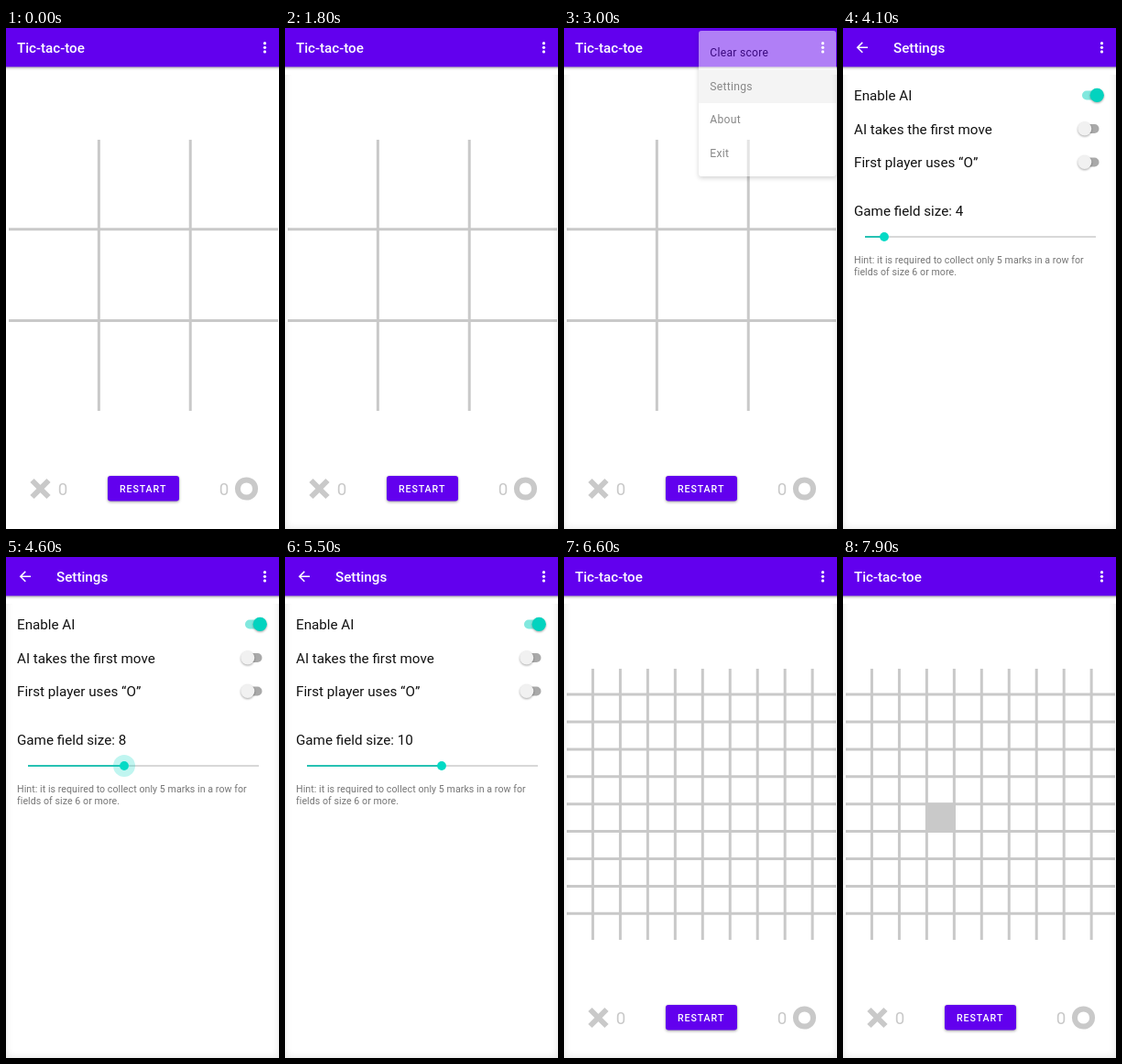
An HTML page that plays this animation: 298x547 px, repeating every 8000 ms.

```html
<!DOCTYPE html>
<html lang="en">
<head>
<meta charset="utf-8">
<title>Tic-tac-toe</title>
<style>
@property --size { syntax: '<integer>'; inherits: true; initial-value: 3; }

html, body { margin: 0; width: 100%; height: 100%; overflow: hidden; background: #fff; }
body { position: relative; font-family: Roboto, sans-serif; }
svg, .settings { position: absolute; left: 0; top: 0; width: 298px; height: 547px; }
svg { display: block; }

/* Every part shares one clock; the tiny head start keeps steps clear of their boundaries */
.edge, .small, .large, .cell, .menu, .ripple::before, .settings, .halo {
  animation: 8s step-end -5ms infinite;
}

.bar { fill: #6200ee; filter: drop-shadow(0 1px 1.5px rgba(0,0,0,.4)); }
.title { font-size: 15.2px; font-weight: 500; fill: #fff; }
.dots { fill: #fff; }
.grid { stroke: #c9c9c9; stroke-width: 3; fill: none; }
.mark { stroke: #c9c9c9; stroke-width: 6; fill: none; }
.score { font-size: 18.8px; fill: #c9c9c9; text-anchor: middle; }
.button { fill: #6200ee; filter: drop-shadow(0 1px 1.5px rgba(0,0,0,.4)); }
.label { font-size: 10.6px; font-weight: 500; letter-spacing: .95px; fill: #fff; }
.cell { fill: #c9c9c9; animation-name: cell; }
.small { animation-name: small; }
.large { animation-name: large; }

.menu {
  position: absolute; left: 147px; top: 3px; width: 150px; height: 146px; padding: 6.4px 0;
  background: #fff; border-radius: 3px; box-shadow: 0 2px 5px rgba(0,0,0,.35);
  color: #111; font-size: 12.14px; letter-spacing: .28px; line-height: 36.5px;
  animation-name: menu;
}
.menu div { position: relative; height: 36.5px; padding-left: 12.3px; overflow: hidden; }
.menu span { position: relative; }
.ripple::before {
  content: ''; position: absolute; left: 50%; top: 50%; width: 100px; height: 100px;
  margin: -50px; border-radius: 50%; background: #e8e8e8; animation-name: ripple;
}

.settings { background: #fff; animation-name: open, size; }
.row { font-size: 15.2px; fill: #111; }
.hint { font-size: 10.62px; letter-spacing: .06px; fill: #757575; }
.size {
  position: absolute; left: 12px; top: 190px; margin: 0;
  font-size: 15.2px; line-height: 20px; color: #111; white-space: pre;
}
.size::after { counter-reset: n var(--size); content: counter(n); }
.knob { transform: translateX(calc((var(--size) - 3) * 21px)); fill: #03dac5; }
.progress { transform: scaleX(calc((var(--size) - 3) / 12)); fill: #14bfb0; }
.halo { animation-name: halo; }
.thumb { filter: drop-shadow(0 1px 1px rgba(0,0,0,.35)); }

.edge {
  position: absolute; left: 0; top: 43px; width: 298px; height: 504px;
  box-shadow: inset 0 0 9px rgba(0,0,0,.11); clip-path: inset(8px 0 0 0);
  animation-name: edge;
}

@keyframes edge { 0% { opacity: 0 } 1.25%, 100% { opacity: 1 } }
@keyframes menu {
  0% { opacity: 0; clip-path: inset(0 0 90% 70%) }
  23.75% { opacity: .35; clip-path: inset(-3px -1px 70% 45%) }
  25% { opacity: .75; clip-path: inset(-3px -1px 35% 18%) }
  26.25% { opacity: 1; clip-path: inset(-3px -1px 8% 3%) }
  27.5% { opacity: 1; clip-path: inset(-3px -1px -9px -8px) }
  37.5% { opacity: .5; clip-path: inset(-3px -1px -9px -8px) }
  38.75%, 100% { opacity: 0 }
}
@keyframes ripple {
  0% { transform: scale(0) }
  35% { transform: scale(1) }
  36.25%, 100% { transform: scale(1.7) }
}
@keyframes open {
  0% { opacity: 0; transform: translateY(30px) }
  38.75% { opacity: .45; transform: translateY(16px) }
  40% { opacity: .9; transform: translateY(4px) }
  41.25% { opacity: 1; transform: none }
  78.75% { opacity: .85; transform: translateY(2px) }
  80% { opacity: .5; transform: translateY(8px) }
  81.25% { opacity: .15; transform: translateY(16px) }
  82.5%, 100% { opacity: 0; transform: translateY(30px) }
}
@keyframes size {
  0% { --size: 3 }
  51.25% { --size: 4 }
  53.75% { --size: 5 }
  55% { --size: 6 }
  56.25% { --size: 7 }
  57.5% { --size: 8 }
  60% { --size: 9 }
  63.75%, 100% { --size: 10 }
}
@keyframes halo {
  0% { opacity: 0 }
  52.5% { opacity: .15 }
  53.75% { opacity: .25 }
  67.5% { opacity: .12 }
  68.75%, 100% { opacity: 0 }
}
@keyframes small { 0% { opacity: 1 } 60%, 100% { opacity: 0 } }
@keyframes large { 0% { opacity: 0 } 60%, 100% { opacity: 1 } }
@keyframes cell { 0% { opacity: 0 } 98.75%, 100% { opacity: 1 } }
</style>
</head>
<body>
<svg viewBox="0 0 298 547">
  <defs>
    <g id="toolbar">
      <rect class="bar" x="-6" y="-6" width="310" height="48.4"/>
      <g class="dots">
        <circle cx="282.5" cy="16.7" r="1.6"/>
        <circle cx="282.5" cy="21.3" r="1.6"/>
        <circle cx="282.5" cy="25.9" r="1.6"/>
      </g>
    </g>
    <g id="off">
      <rect x="259" y="-5" width="20.5" height="10" rx="5" fill="#a9a9a9"/>
      <circle class="thumb" cx="263.8" r="7.5" fill="#f1f1f1"/>
    </g>
  </defs>
  <use href="#toolbar"/>
  <text class="title" x="12" y="27">Tic-tac-toe</text>
  <path class="grid small" data-cells="3"/>
  <path class="grid large" data-cells="10"/>
  <rect class="cell" x="90" y="268.5" width="33" height="32.5"/>
  <path class="mark" d="M28.5 494l18 18m0-18l-18 18"/>
  <text class="score" x="62" y="510">0</text>
  <rect class="button" x="111" y="489" width="78" height="27.5" rx="3"/>
  <text class="label" x="124" y="506.7">RESTART</text>
  <text class="score" x="238" y="510">0</text>
  <circle class="mark" cx="262.5" cy="503" r="9.6"/>
</svg>

<div class="menu">
  <div>Clear score</div>
  <div class="ripple"><span>Settings</span></div>
  <div>About</div>
  <div>Exit</div>
</div>

<div class="settings">
  <svg viewBox="0 0 298 547">
    <use href="#toolbar"/>
    <path d="M27 21.3H16M21.3 15.8L15.8 21.3L21.3 26.8" fill="none" stroke="#fff" stroke-width="1.6"/>
    <text class="title" x="55" y="27">Settings</text>
    <g class="row">
      <text x="12" y="79.3">Enable AI</text>
      <text x="12" y="115.8">AI takes the first move</text>
      <text x="12" y="152.2">First player uses “O”</text>
    </g>
    <rect x="261" y="68.5" width="21" height="10" rx="5" fill="#81e8de"/>
    <circle class="thumb" cx="277.3" cy="73.3" r="7.6" fill="#03d3bf"/>
    <use href="#off" y="110"/>
    <use href="#off" y="146.5"/>
    <rect x="24" y="227.2" width="252" height="1.6" fill="#cfcfcf"/>
    <g transform="translate(24 228)">
      <rect class="progress" y="-.9" width="252" height="1.8"/>
      <g class="knob">
        <circle class="halo" r="12"/>
        <circle r="4.9"/>
      </g>
    </g>
    <text class="hint" x="12" y="257.3">Hint: it is required to collect only 5 marks in a row for</text>
    <text class="hint" x="12" y="270.2">fields of size 6 or more.</text>
  </svg>
  <p class="size">Game field size: </p>
</div>
<div class="edge"></div>

<script>
for (const grid of document.querySelectorAll('[data-cells]')) {
  const cells = +grid.dataset.cells;
  let d = '';
  for (let i = 1; i < cells; i++) {
    const x = 1.5 + 299.6 * i / cells;
    const y = 120.2 + 299 * i / cells;
    d += `M${x} 122V418M3 ${y}H297`;
  }
  grid.setAttribute('d', d);
}
</script>
</body>
</html>
```
